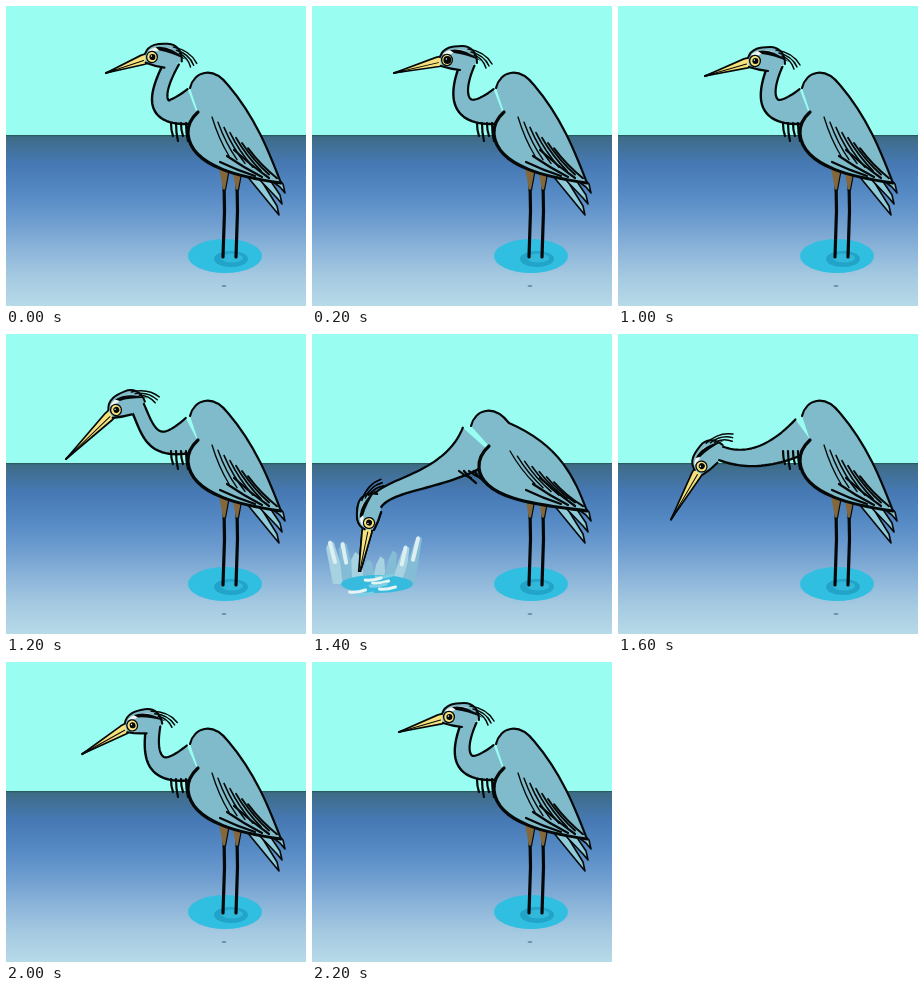
Animation of 300 by 300 pixels, one loop 2.4 s. Source, as an HTML page with a canvas:

```html
<!DOCTYPE html>
<html lang="en">
<head>
<meta charset="utf-8">
<title>Heron fishing</title>
<style>
  html, body { margin: 0; width: 100%; height: 100%; overflow: hidden; }
  canvas { display: block; width: 100vw; height: 100vh; }
</style>
</head>
<body>
<canvas id="stage"></canvas>
<script>
const canvas = document.getElementById('stage');
const ctx = canvas.getContext('2d');
const BLUE = '#7fbbca', YELLOW = '#f6e27c', INK = '#050808', BROWN = '#84683c';
const LOOP = 2400;

const lerp = (a, b, t) => a + (b - a) * t;
const add = ([x, y], dx, dy) => [x + dx, y + dy];

// Blend two poses, number by number.
function mix(a, b, t) {
  if (typeof a === 'number') return lerp(a, b, t);
  if (Array.isArray(a)) return a.map((v, i) => mix(v, b[i], t));
  return Object.fromEntries(Object.keys(a).map(k => [k, mix(a[k], b[k], t)]));
}

// The neck is one cubic curve, with "upper" and "lower" as its control points.
const ready = { eye: [137, 55], tip: [87, 70], upper: [143, 92], lower: [148, 115], turn: 0, bend: 0, pupil: 3 };
const aim = { ...ready, eye: [110, 76], tip: [60, 125], upper: [142, 95], lower: [145, 122], turn: -22 };
const strike = { ...ready, eye: [57, 189], tip: [46, 246], upper: [78, 148], lower: [132, 149], turn: -80, bend: 1 };
const tall = { ...ready, eye: [146, 51], tip: [100, 67], upper: [146, 92], turn: 3 };
const alert = { ...ready, eye: [135, 54], tip: [82, 67], upper: [141, 92], pupil: 4 };
const blink = { ...alert, pupil: 0 };
const lean = mix(ready, aim, .4);
const lunge = { ...mix(aim, strike, .5), bend: 0 };

const steps = [
  [0, tall], [200, alert], [400, blink], [600, alert], [800, tall],
  [1000, ready], [1100, lean], [1200, aim], [1300, lunge], [1400, strike],
  [1600, lunge], [1800, aim], [2000, lean], [2200, ready]
];

function stroke(width, color = INK) {
  ctx.strokeStyle = color;
  ctx.lineWidth = width;
  ctx.stroke();
}

function fill(color) {
  ctx.fillStyle = color;
  ctx.fill();
}

function trace(points) {
  ctx.beginPath();
  points.forEach(p => ctx.lineTo(...p));
}

function line(points, width, color) {
  trace(points);
  stroke(width, color);
}

// Arc from a to b that bulges sideways.
function arc(a, b, bulge, width, color) {
  ctx.beginPath();
  ctx.moveTo(...a);
  ctx.quadraticCurveTo((a[0] + b[0]) / 2 - bulge, (a[1] + b[1]) / 2 + bulge, ...b);
  stroke(width, color);
}

function shape(path, color, width) {
  const p = new Path2D(path);
  if (color) { ctx.fillStyle = color; ctx.fill(p); }
  if (width) { ctx.strokeStyle = INK; ctx.lineWidth = width; ctx.stroke(p); }
}

function oval(x, y, rx, ry, color) {
  ctx.beginPath();
  ctx.ellipse(x, y, rx, ry, 0, 0, 7);
  fill(color);
}

function drawScene() {
  ctx.fillStyle = '#99fdf1';
  ctx.fillRect(0, 0, 300, 130);
  const water = ctx.createLinearGradient(0, 129, 0, 300);
  const shades = ['#3d6b83', '#4679b4', '#5489c4', '#6d9ccf', '#8bb4d9', '#a5cae1', '#b7dae8'];
  shades.forEach((color, i) => water.addColorStop(i / (shades.length - 1), color));
  ctx.fillStyle = water;
  ctx.fillRect(0, 129, 300, 171);
  ctx.fillStyle = '#2b5a62';
  ctx.fillRect(0, 129, 300, 1.2);
  oval(219, 250, 37, 17, '#30bfe0');
  oval(225, 253, 17, 8, '#21a4c8');
  oval(226, 252, 11, 4.5, '#30b8da');
  oval(218, 280, 2.5, .8, '#477791');
}

function drawLegs() {
  for (const x of [217, 230]) {
    line([[x + 1, 175], [x + 1.5, 205], [x, 251]], 3.2);
    trace([[x - 4, 162], [x + 6, 165], [x + 2.5, 184], [x, 184]]);
    fill(BROWN);
    stroke(1.2);
  }
}

function drawTail() {
  for (let i = 0; i < 3; i++) {
    const root = [241 + 9 * i, 170], tip = [273 + 3 * i, 209 - 11 * i];
    trace([root, add(tip, -5, -6), tip, add(tip, -2, -9), add(root, 14, 4)]);
    ctx.closePath();
    fill('#8fcbd9');
    stroke(1.6);
  }
}

// Bending pulls the shoulder and chest forward and down.
function drawBody(bend) {
  const shoulder = (x, y) => [x - 25 * bend, y + 10 * bend];
  const chest = (x, y) => [x - 15 * bend, y + 6 * bend];
  const back = () => {
    ctx.bezierCurveTo(...shoulder(188, 66), ...shoulder(206, 59), ...shoulder(222, 79));
    ctx.bezierCurveTo(250, 112, 263, 146, 275, 177);
  };
  const belly = () => {
    ctx.bezierCurveTo(240, 172, ...chest(185, 162), ...chest(182, 128));
    ctx.quadraticCurveTo(...chest(181, 116), ...chest(192, 106));
  };
  const start = shoulder(184, 82);

  ctx.beginPath();
  ctx.moveTo(...start);
  back();
  belly();
  fill(BLUE);
  ctx.beginPath();
  ctx.moveTo(...start);
  back();
  stroke(2.2);
  ctx.beginPath();
  ctx.moveTo(275, 177);
  belly();
  stroke(3.2);

  for (let i = 0; i < 7; i++) {
    const top = [206 + 6 * i - 8 * bend * (1 - i / 6), 111 + 5.2 * i + 6 * bend];
    arc(top, [223 + 8 * i, 150 + 3.7 * i], 2, 1.3 + .12 * i);
  }
  for (let i = 0; i < 3; i++) {
    arc([214 + 7 * i, 156 - 6 * i], [249 + 7 * i, 170 + i], 1, 2.2);
  }

  // Breast plumes
  for (let i = 0; i < 4; i++) {
    const root = [165 + 5 * i - 18 * bend, 117 + 20 * bend];
    arc(root, add(root, 2 + 10 * bend, 13 + 5 * (i % 2) - 6 * bend), 1, 2.2);
  }
}

function drawNeck(pose, nape) {
  const { upper, lower, bend } = pose;
  const base = [188 - 20 * bend, 100 + 9 * bend];
  const along = t => [0, 1].map(k =>
    (1 - t) ** 3 * nape[k] + 3 * t * (1 - t) ** 2 * upper[k] + 3 * t * t * (1 - t) * lower[k] + t ** 3 * base[k]);
  const back = [], throat = [];
  for (let t = 0; t <= 1; t += 1 / 32) {
    const [x, y] = along(t);
    const [nx, ny] = along(t + .01);
    const angle = Math.atan2(ny - y, nx - x);
    const half = 7 + (11 + 5 * bend) * t ** 3;
    const dx = half * Math.sin(angle), dy = -half * Math.cos(angle);
    back.push([x + dx, y + dy]);
    throat.push([x - dx, y - dy]);
  }
  trace([...back, ...throat.reverse()]);
  fill(BLUE);
  line(back, 2.2);
  line(throat, 2.4);
}

function drawBill({ eye: [x, y], tip: [tx, ty] }) {
  const length = Math.hypot(tx - x, ty - y);
  ctx.save();
  ctx.translate(x, y);
  ctx.rotate(Math.atan2(ty - y, tx - x));
  trace([[3, 5], [10, 5.2], [length, 0], [9, -4.5], [3, -4]]);
  ctx.closePath();
  fill(YELLOW);
  stroke(1.7);
  line([[9, -.5], [length, 0]], 1);
  line([[length - 9, 0], [length, 0]], 2.2);
  ctx.restore();
}

function drawHead(pose) {
  const crown = 'M-7-3C-4-13 6-14 15-14S30-8 30 3';
  ctx.save();
  ctx.translate(...pose.eye);
  ctx.rotate(pose.turn * Math.PI / 180);
  shape(crown + 'L13 10Q3 9-6 6Z', BLUE);
  shape('M-4-6Q3-13 20-9Q10-10 4-6Z', '#edf5ee');
  shape('M3-10Q17-13 34 1Q18-6 7-7Z', INK);
  shape(crown, null, 2);
  shape('M13 10Q3 9-6 6', null, 2.2);
  for (let i = 0; i < 3; i++) arc([21 + 3 * i, -11 + 3 * i], [45 - 3 * i, 4 + 2 * i], -5 + i, 1.5);
  oval(0, 0, 6, 6.2, INK);
  oval(0, 0, 4.7, 5, pose.pupil ? YELLOW : BLUE);
  if (pose.pupil) {
    oval(.4, 0, pose.pupil, pose.pupil, INK);
    oval(-.6, -1, .7, .7, '#fff');
  } else {
    line([[-5, 0], [0, 1.5], [5, 0]], 1.6);
  }
  ctx.restore();
}

function drawSplash() {
  let seed = 7;
  const random = () => (seed = seed * 16807 % 2147483647) / 2147483647;
  const plumes = 8;
  for (let i = 0; i < plumes; i++) {
    const side = 2 * i / (plumes - 1) - 1;
    const x = 62 + 34 * side, height = 20 + 24 * Math.abs(side) + 6 * random();
    const tip = [x + 10 * side, 250 - height];
    trace([[x - 7, 250], add(tip, -4, 8), tip, add(tip, 4, 3), [x + 7, 250]]);
    fill(i % 2 ? '#84bcd5' : '#a6d2e2');
    if (Math.abs(side) > .5) line([add(tip, 0, 3), [x + 5 * side, 250 - height / 2]], 4, '#dceff3');
  }
  oval(65, 250, 36, 9, '#36bbdf');
  for (let i = 0; i < 7; i++) {
    const x = 32 + 52 * random(), y = 243 + 3 * i;
    arc([x - 7, y], [x + 9, y - 2], 2, 3, i % 3 ? '#e6f4f4' : '#7fcfe4');
  }
}

function draw(pose) {
  const angle = pose.turn * Math.PI / 180;
  const [c, s] = [Math.cos(angle), Math.sin(angle)];
  const nape = add(pose.eye, 21 * c - 3 * s, 21 * s + 3 * c);
  ctx.setTransform(canvas.width / 300, 0, 0, canvas.height / 300, 0, 0);
  ctx.lineCap = ctx.lineJoin = 'round';
  drawScene();
  drawLegs();
  drawTail();
  drawNeck(pose, nape);
  drawBody(pose.bend);
  drawBill(pose);
  drawHead(pose);
  if (pose.bend) {
    drawSplash();
    ctx.save();
    ctx.beginPath();
    ctx.rect(0, 0, 300, 238);
    ctx.clip();
    drawBill(pose);
    drawHead(pose);
    ctx.restore();
  }
}

function resize() {
  const ratio = window.devicePixelRatio || 1;
  canvas.width = Math.round(innerWidth * ratio);
  canvas.height = Math.round(innerHeight * ratio);
}

let start;
function frame(now) {
  start ??= now;
  const time = (now - start) % LOOP;
  draw(steps.findLast(([at]) => at <= time)[1]);
  requestAnimationFrame(frame);
}

resize();
addEventListener('resize', resize);
draw(tall);
requestAnimationFrame(frame);
</script>
</body>
</html>
```
